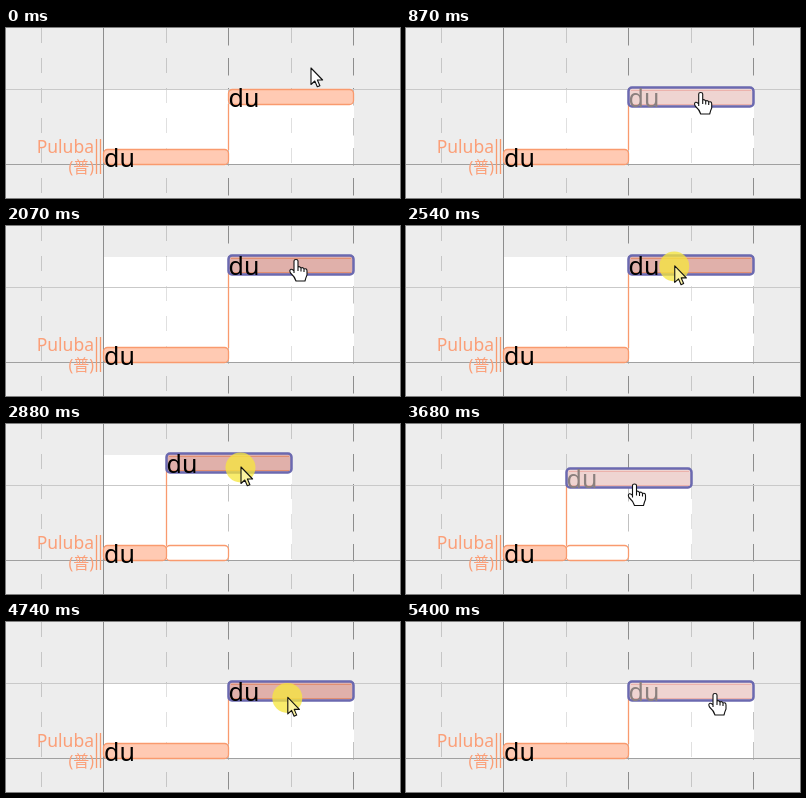
Recreate the animation shown at these times as an HTML page. Size 394 by 170 pixels, loop 6 s.

```html
<!DOCTYPE html>
<html lang="en">
<head>
<meta charset="utf-8">
<title>Dragging a note</title>
<style>
  html, body { margin: 0; width: 100%; height: 100%; overflow: hidden; background: #ededed; }
  svg { display: block; }
  text { font-family: "Noto Sans", "Open Sans", "Noto Sans CJK SC", "Noto Sans CJK", sans-serif; }
  .lyric { font-size: 25px; }
  .track { font-size: 17.5px; font-weight: 500; fill: #fb9f78; text-anchor: end; }
  .note { fill: #ffcab3; stroke: #f99a6e; stroke-width: 1.3; }
  .wire { fill: none; stroke: #f99a6e; stroke-width: 1.3; }
  .major { stroke: #8d8d8d; stroke-dasharray: 17.5 12.5; }
  .minor { stroke: #c6c6c6; stroke-dasharray: 15 15; }
  .cursor path { fill: #fff; stroke: #111; stroke-width: 1.1; stroke-linejoin: round; }
</style>
</head>
<body>
<svg width="394" height="170" viewBox="0 0 394 170">
  <rect width="394" height="170" fill="#ededed"/>
  <rect id="sheet" x="97" fill="#fff"/>
  <g id="ticks"></g>
  <rect id="veil" x="97" fill="#fff" opacity=".45"/>
  <path d="M0 61.5H394" stroke="#c9c9c9"/>
  <path d="M0 136.5H394" stroke="#a0a0a0"/>
  <path d="M97.5 0V170" stroke="#8d8d8d"/>

  <text class="track" x="88" y="125">Puluba</text>
  <text class="track" x="88" y="145" style="font-size:16px">(普)</text>
  <path class="wire" d="M90.5 111V146M94.5 111V146"/>

  <rect id="rest" class="wire" x="160" y="121.5" width="62.5" height="15" rx="4"/>
  <rect id="first" class="note" x="97.5" y="121.5" height="15" rx="4"/>
  <text class="lyric" x="98" y="139">du</text>

  <path id="link" class="wire"/>
  <g id="second">
    <rect id="body" class="note" x=".5" y=".5" width="125" height="15" rx="4"/>
    <rect id="frame" x=".5" y="-1.5" width="125" height="19" rx="3.5" stroke="#6b69b0" stroke-width="2.5"/>
    <path id="inner" d="M3 1.5H123M3 15.5H123"/>
    <text id="word" class="lyric" x=".5" y="18">du</text>
  </g>

  <g id="pointer" class="cursor">
    <circle id="press" cx="-.5" cy=".5" r="15" fill="#f6e63c" opacity=".76"/>
    <path id="arrow" d="M0 0V16.5L3.8 13L6.3 18.8L8.9 17.7L6.4 12H11.6Z"/>
    <path id="hand" d="M-2 14V2Q-2 .5 0 .5Q2 .5 2 2V8Q3.5 6.8 5 9Q7 7.8 8 10Q11 9 11 12V16Q10 18 9 22H0Q-1 18 -5.5 14Q-7 11 -5 10.3Q-3.5 10 -2 12M2 8V12M5 9V12.5M8 10V13"/>
  </g>
</svg>
<script>
const $ = id => document.getElementById(id);
const set = (id, attrs) => {
  for (const k in attrs) $(id).setAttribute(k, attrs[k]);
};
const show = (id, on) => set(id, { visibility: on ? "visible" : "hidden" });

const LOOP = 6000, FPS = 15;

// Pointer path: step, x, y
const path = [
  [0, 305, 40], [7, 305, 40], [14, 293, 68], [16, 293, 68], [21, 293, 46],
  [24, 290, 33], [34, 290, 33], [35, 289, 38], [43, 235, 43], [47, 228.5, 59.5],
  [58, 228.5, 59.5], [66, 240, 80.5], [68, 241, 82], [73, 309, 71], [90, 309, 71]
];

// Button held: first step, release step, step at which the fill fades
const holds = [[17, 31, 32], [35, 55, 55], [59, 80, 81]];

const rule = (x, kind) => `<path class="${kind}" d="M${x + .5} 0V170"/>`;
$("ticks").innerHTML =
  [35, 160, 285].map(x => rule(x, "minor")).join("") +
  [222, 347].map(x => rule(x, "major")).join("");

function pointerAt(step) {
  const i = Math.max(1, path.findIndex(p => p[0] >= step));
  const [a, x0, y0] = path[i - 1], [b, x1, y1] = path[i];
  const k = (step - a) / (b - a);
  return [x0 + (x1 - x0) * k, y0 + (y1 - y0) * k];
}

function draw(step) {
  const [x, y] = pointerAt(step);
  const held = holds.some(h => step >= h[0] && step < h[1]);
  const solid = holds.some(h => step >= h[0] && step < h[2]);
  const over = step >= 17 || y > 60;

  // The note snaps to beats and semitone rows
  const left = x > 260 ? 222 : 160;
  const row = step < 17 ? 61 : Math.floor((y - 1) / 15) * 15 + 1;

  const area = { y: row, width: left + 126 - 97, height: 136 - row };
  set("sheet", area);
  set("veil", area);
  set("first", { width: left - 97 });
  show("rest", left === 160);
  set("link", { d: `M${left + .5} ${row + 15}V122` });
  set("second", { transform: `translate(${left} ${row})` });

  show("body", !over);
  show("frame", over);
  show("inner", over);
  set("frame", { fill: solid ? "#e0b0aa" : "#efd4d1" });
  set("inner", { stroke: solid ? "#e18f72" : "#ecb2ac" });
  set("word", { fill: over && !solid ? "#8b807e" : "#000" });

  set("pointer", { transform: `translate(${x.toFixed(2)} ${y.toFixed(2)})` });
  show("press", held);
  show("arrow", held || !over);
  $("arrow").style.fill = held ? "#fbf2a0" : "#fff";
  show("hand", over && !held);
}

const start = performance.now();
function tick() {
  const t = (performance.now() - start) % LOOP;
  draw(Math.floor((t + 4) * FPS / 1000) % 90);
  requestAnimationFrame(tick);
}
tick();
</script>
</body>
</html>
```
